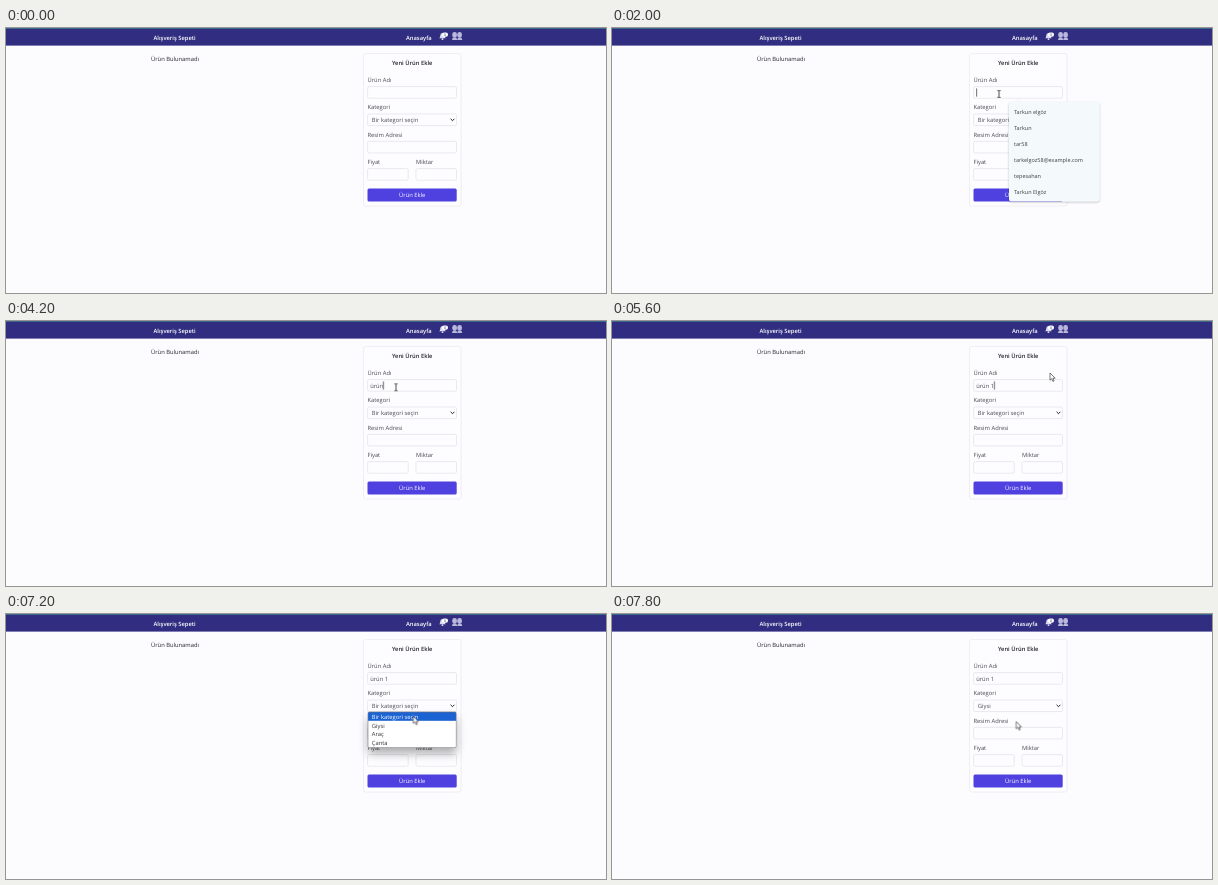
Write an HTML page that moves like this. It is 600 px wide and 265 px high and loops after 8 s.

```html
<!DOCTYPE html>
<html lang="tr">
<head>
<meta charset="utf-8">
<title>Alışveriş Sepeti</title>
<style>
  html, body { margin: 0; width: 100%; height: 100%; overflow: hidden; background: #fcfbfe; }
  svg { display: block; width: 100%; height: 100%; }
  text {
    font: 5.8px "Open Sans", "Noto Sans", sans-serif;
    fill: #4a4a52;
    text-rendering: geometricPrecision;
    white-space: pre;
  }
  .bold { font-weight: 600; }
  .mid { text-anchor: middle; }
  .light { fill: #fff; }
  .dark { fill: #24242c; }
  .field { fill: #fdfcfe; stroke: #e3e1e7; stroke-width: .7; }
  .hints text { font-size: 5.5px; fill: #3a3f44; }
  .options text { fill: #33333a; }

  /* 2.5% of the loop is 200 ms */
  .step { animation: 8s step-end infinite; }
  .pointer { animation-name: pointer; }
  .arrow { animation-name: arrow; }
  .beam { animation-name: beam; }
  .typing { animation-name: typing; }
  .caret { animation-name: caret; }
  .hints { animation-name: hints; }
  .options { animation-name: options; }
  .active { animation-name: active; }
  .options .first { animation-name: first; }
  .options .second { animation-name: second; }
  .empty { animation-name: empty; }
  .chosen { animation-name: chosen; }

  @keyframes pointer {
    0%, 12.5% { transform: translate(548px, 1px); }
    15% { transform: translate(505px, 20px); }
    17.5% { transform: translate(440px, 46px); }
    20% { transform: translate(391px, 64px); }
    22.5%, 25% { transform: translate(387px, 66px); }
    27.5% { transform: translate(386.5px, 84px); }
    30% { transform: translate(388px, 68px); }
    32.5% { transform: translate(390px, 66.3px); }
    70% { transform: translate(438px, 52px); }
    72.5% { transform: translate(530px, 31.5px); }
    75% { transform: translate(492px, 50px); }
    77.5% { transform: translate(436px, 76px); }
    80% { transform: translate(412.3px, 87px); }
    82.5% { transform: translate(411.5px, 89.5px); }
    85% { transform: translate(410.5px, 94px); }
    87.5% { transform: translate(409px, 99px); }
    90% { transform: translate(407.3px, 102.3px); }
    92.5% { transform: translate(406px, 110px); }
    95% { transform: translate(405px, 110px); }
    97.5%, 100% { transform: translate(404.2px, 107.6px); }
  }
  @keyframes arrow {
    0% { opacity: 0; }
    12.5% { opacity: 1; }
    20% { opacity: 0; }
    27.5% { opacity: 1; }
    30% { opacity: 0; }
    70%, 100% { opacity: 1; }
  }
  @keyframes beam {
    0% { opacity: 0; }
    20% { opacity: 1; }
    27.5% { opacity: 0; }
    30% { opacity: 1; }
    60%, 100% { opacity: 0; }
  }
  @keyframes typing {
    0% { transform: translateX(0); }
    42.5% { transform: translateX(3.5px); }
    45% { transform: translateX(5.8px); }
    47.5% { transform: translateX(9.3px); }
    52.5% { transform: translateX(12.8px); }
    60% { transform: translateX(14.4px); }
    62.5%, 100% { transform: translateX(17.8px); }
  }
  @keyframes caret {
    0% { opacity: 0; }
    22.5% { opacity: 1; }
    30% { opacity: 0; }
    37.5% { opacity: 1; }
    82.5%, 100% { opacity: 0; }
  }
  @keyframes hints {
    0% { opacity: 0; }
    22.5% { opacity: 1; }
    42.5%, 100% { opacity: 0; }
  }
  @keyframes options {
    0% { opacity: 0; }
    82.5% { opacity: 1; }
    95%, 100% { opacity: 0; }
  }
  @keyframes active {
    0% { transform: translateY(0); }
    92.5%, 100% { transform: translateY(8.8px); }
  }
  @keyframes first {
    0% { fill: #fff; }
    92.5%, 100% { fill: #33333a; }
  }
  @keyframes second {
    0% { fill: #33333a; }
    92.5%, 100% { fill: #fff; }
  }
  @keyframes empty {
    0% { opacity: 1; }
    95%, 100% { opacity: 0; }
  }
  @keyframes chosen {
    0% { opacity: 0; }
    95%, 100% { opacity: 1; }
  }
</style>
</head>
<body>
<svg viewBox="0 0 600 265">
  <defs>
    <filter id="soft" x="-30%" y="-30%" width="160%" height="190%">
      <feDropShadow dx="0" dy="1" stdDeviation="1.2" flood-opacity=".25"/>
    </filter>
    <filter id="deep" x="-30%" y="-50%" width="160%" height="260%">
      <feDropShadow dx="0" dy="6" stdDeviation="5" flood-opacity=".32"/>
    </filter>
    <clipPath id="list"><rect x="362" y="98" width="88.3" height="35.6" rx="1.4"/></clipPath>
  </defs>

  <rect width="600" height="265" fill="#fcfbfe"/>

  <!-- navigation -->
  <rect width="600" height="17.6" fill="#312e81"/>
  <rect width="600" height=".9" fill="#3f6f8c"/>
  <text class="bold light" x="147.5" y="11.5" font-size="5.7">Alışveriş Sepeti</text>
  <text class="bold light" x="400" y="11.5">Anasayfa</text>
  <g fill="#dcdcf0">
    <path d="M433.2 10.3q1-.8 1-2.6 0-2.6 2.3-2.8 2.3.2 2.3 2.8 0 1.8 1 2.6z"/>
    <circle cx="436.5" cy="11.2" r=".9"/>
    <rect x="436" y="4.6" width="6" height="4.2" rx="2" fill="#fff"/>
    <text x="439" y="8.1" class="mid" style="font-size:3.6px;fill:#312e81">0</text>
  </g>
  <g fill="#b9b7dc">
    <rect x="446.3" y="4" width="4.6" height="5.6" rx="2.2"/>
    <rect x="451.3" y="4" width="4.6" height="5.6" rx="2.2"/>
    <path d="M446 12q.3-2.8 2.6-2.8t2.5 2.8zM451.2 12q.3-2.8 2.5-2.8t2.5 2.8z"/>
  </g>

  <text class="dark" x="145" y="32.7">Ürün Bulunamadı</text>

  <!-- form -->
  <rect x="357.5" y="25.6" width="97.5" height="152.4" rx="2" fill="#fdfcfe" stroke="#eceaf0" stroke-width=".8"/>
  <text class="bold mid dark" x="406.2" y="37.4">Yeni Ürün Ekle</text>
  <text x="361.5" y="53.8">Ürün Adı</text>
  <text x="361.5" y="81.4">Kategori</text>
  <text x="361.5" y="108.8">Resim Adresi</text>
  <text x="361.5" y="136">Fiyat</text>
  <text x="410" y="136">Miktar</text>
  <rect class="field" x="361.6" y="58.6" width="88.9" height="11.6" rx="1.4"/>
  <rect class="field" x="361.6" y="86" width="88.9" height="11.6" rx="1.4"/>
  <rect class="field" x="361.6" y="113.3" width="88.9" height="11.6" rx="1.4"/>
  <rect class="field" x="361.6" y="140.6" width="40.6" height="11.6" rx="1.4"/>
  <rect class="field" x="410" y="140.6" width="40.5" height="11.6" rx="1.4"/>
  <rect x="361.5" y="160.5" width="89.2" height="13" rx="1.5" fill="#4f40e0"/>
  <text class="mid light" x="406.2" y="169.2">Ürün Ekle</text>

  <text x="364.2" y="66.7">ürün 1</text>
  <g class="step typing">
    <rect x="364" y="60" width="22" height="9" fill="#fdfcfe"/>
    <rect class="step caret" x="364.4" y="60.4" width=".7" height="8.2" fill="#333"/>
  </g>

  <text class="step empty" x="365.8" y="94">Bir kategori seçin</text>
  <text class="step chosen" x="365.8" y="94">Giysi</text>
  <path d="M444.6 90.8l1.9 1.9 1.9-1.9" fill="none" stroke="#222" stroke-width="1"/>

  <!-- suggestions -->
  <g class="step hints">
    <path d="M399 74h5l2.6-2.6 2.6 2.6h76.2q2 0 2 2v95.2q0 2-2 2h-86.4q-2 0-2-2v-95.2q0-2 2-2z" fill="#f4fafb" filter="url(#soft)"/>
    <text x="402" y="86.2">Tarkun elgöz</text>
    <text x="402" y="102.1">Tarkun</text>
    <text x="402" y="118">tar58</text>
    <text x="402" y="133.9">tarkelgoz58@example.com</text>
    <text x="402" y="149.8">tepesahan</text>
    <text x="402" y="165.7">Tarkun Elgöz</text>
  </g>

  <!-- category list -->
  <g class="step options">
    <rect x="362" y="98" width="88.3" height="35.6" rx="1.4" fill="#fff" filter="url(#deep)"/>
    <g clip-path="url(#list)">
      <rect class="step active" x="362" y="98" width="88.3" height="8.8" fill="#1b62d2"/>
    </g>
    <rect x="362" y="98" width="88.3" height="35.6" rx="1.4" fill="none" stroke="#77777f" stroke-width=".6"/>
    <text class="step first" x="365.8" y="104.7">Bir kategori seçin</text>
    <text class="step second" x="365.8" y="113.5">Giysi</text>
    <text x="365.8" y="122.3">Araç</text>
    <text x="365.8" y="131.1">Çanta</text>
  </g>

  <g class="step pointer">
    <path class="step arrow" d="M0 0v7.2l1.7-1.5 1.2 2.7 1.2-.5-1.2-2.7h2.3z" fill="#fff" stroke="#222" stroke-width=".6"/>
    <path class="step beam" d="M-1.6-3.4h1.2l.4.4.4-.4h1.2M-1.6 3.4h1.2l.4-.4.4.4h1.2M0-3v6" fill="none" stroke="#222" stroke-width=".8"/>
  </g>
</svg>
</body>
</html>
```
